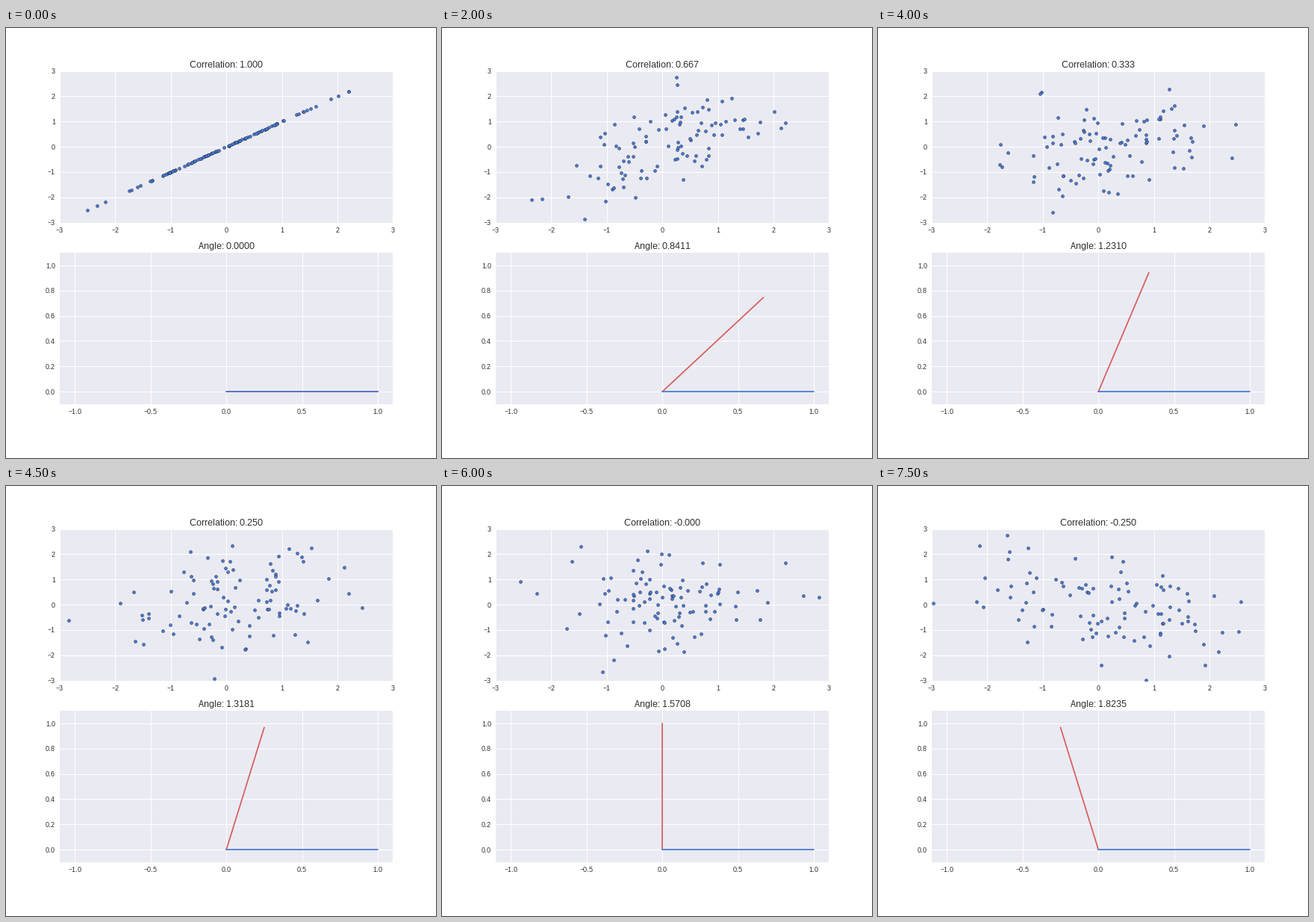
Write a matplotlib script that moves like this. It is 576 by 576 pixels and loops after 8 s.

```python
import numpy as np
import matplotlib.pyplot as plt
from matplotlib.animation import FuncAnimation

FRAMES, INTERVAL, COUNT = 16, 500, 100
BLUE, RED, INK, PANEL = "#4878CF", "#D65F5F", "#262626", "#EAEAF2"

plt.rcParams.update({
    "font.family": "Liberation Sans",
    "text.color": INK,
    "text.hinting": "native",
    "text.hinting_factor": 1,
    "lines.linewidth": 1.75,
    "lines.solid_capstyle": "round",
})


def correlation(step):
    # Falls by a twelfth per step; the tiny offset keeps zero negative
    return 1 - step / 12 - 1e-12


def cloud(step):
    """Fresh standard normal pairs with the step's correlation."""
    rng = np.random.default_rng(40 + step)
    c = correlation(step)
    x, noise = rng.standard_normal((2, COUNT))
    return np.column_stack([x, c * x + np.sqrt(1 - c * c) * noise])


def style(ax, xlim, ylim, xticks, yticks):
    ax.set(xlim=xlim, ylim=ylim, xticks=xticks, yticks=yticks,
           facecolor=PANEL)
    ax.set_axisbelow(True)
    ax.grid(color="white", linewidth=1, linestyle="-")
    ax.tick_params(length=0, pad=6, labelsize=9, labelcolor=INK)
    for spine in ax.spines.values():
        spine.set_visible(False)
    return ax.set_title("", fontsize=12, pad=5)


fig, (top, bottom) = plt.subplots(2, 1, figsize=(8, 8), dpi=72,
                                  facecolor="white")
fig.subplots_adjust(left=.125, right=.9, bottom=.125, top=.9, hspace=.2)

top_title = style(top, (-3, 3), (-3, 3), range(-3, 4), range(-3, 4))
bottom_title = style(bottom, (-1.1, 1.1), (-.1, 1.1),
                     np.linspace(-1, 1, 5), np.linspace(0, 1, 6))

dots = top.scatter([], [], s=17, c=BLUE, edgecolors="black", linewidths=.3)
arm, = bottom.plot([0, 1], [0, 0], color=RED)
bottom.plot([0, 1], [0, 0], color=BLUE)


def update(step):
    c = correlation(step)
    angle = np.arccos(c)
    dots.set_offsets(cloud(step))
    arm.set_data([0, np.cos(angle)], [0, np.sin(angle)])
    top_title.set_text(f"Correlation: {c:.3f}")
    bottom_title.set_text(f"Angle: {angle:.4f}")
    return dots, arm, top_title, bottom_title


anim = FuncAnimation(fig, update, frames=FRAMES, interval=INTERVAL,
                     repeat=True, repeat_delay=0, blit=False)
plt.show()
```
